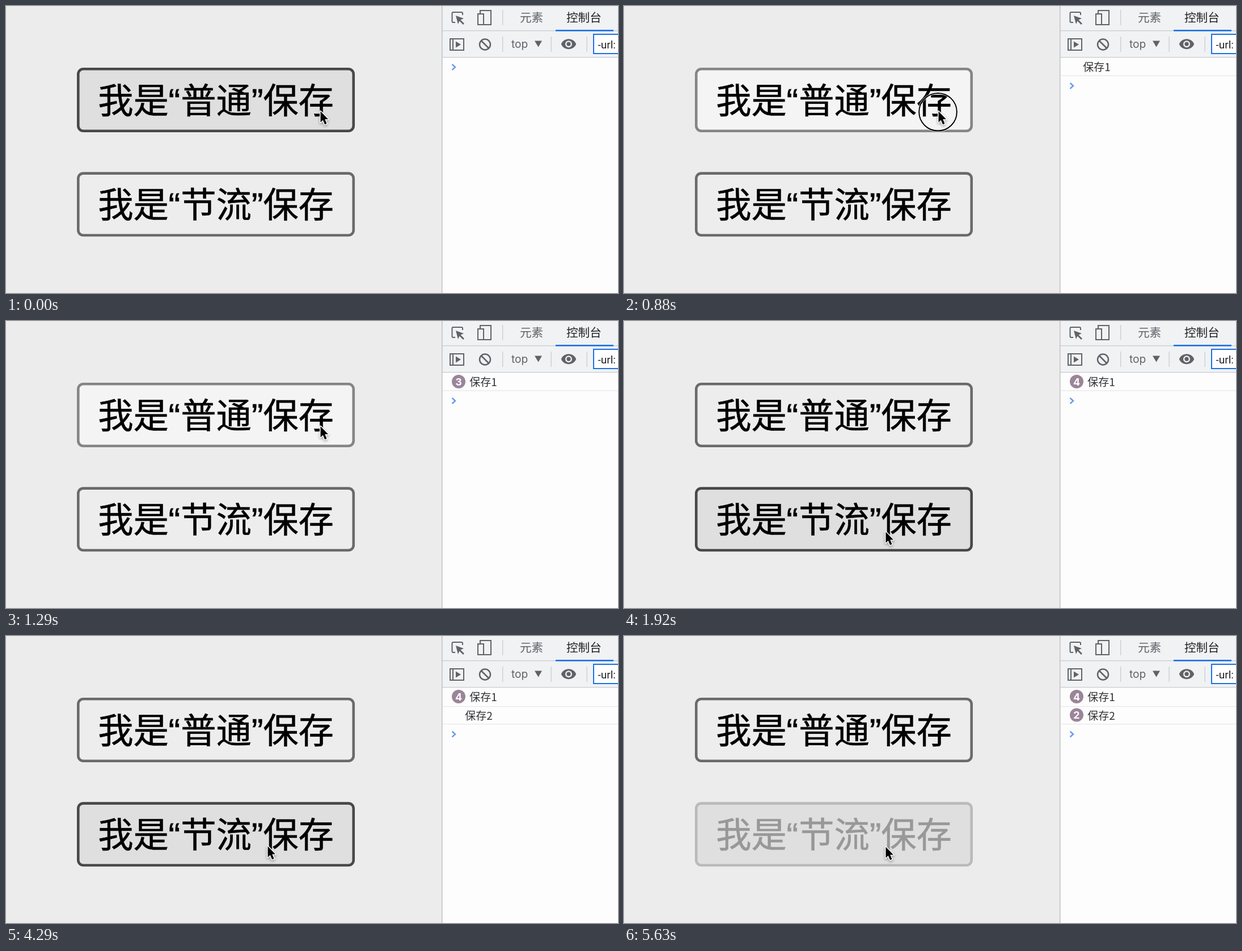
Animation, 1079 px wide and 507 px high, one loop 5930 ms. Source, as an HTML page with a canvas:

```html
<!DOCTYPE html>
<html lang="zh-CN">
<head>
<meta charset="utf-8">
<style>
  html, body { margin: 0; width: 100%; height: 100%; overflow: hidden; background: #ececec; }
  canvas { display: block; }
</style>
</head>
<body>
<canvas id="stage" width="1079" height="507"></canvas>
<script>
const ctx = document.getElementById('stage').getContext('2d');
const LOOP = 5930, LAG = 40, THROTTLE = 2000;
const CJK = '"Noto Sans CJK SC", "Noto Sans CJK", sans-serif';
const LATIN = 'Inter, Roboto, sans-serif';
const QUOTE = '"Liberation Sans", sans-serif';
const GREY = '#5f6368', LINE = '#c9ccd1', BLUE = '#1a6fe8';

// mouse down / up times
const plainClicks = [[580, 700], [780, 900], [980, 1090], [1170, 1290]];
const savedClicks = [[1990, 2070], [4580, 4960]];
const ignoredClicks = [[2210, 2290], [2410, 2500], [2620, 2710], [2790, 2880], [2960, 3040], [5540, 5630]];
const allClicks = [...plainClicks, ...savedClicks, ...ignoredClicks];

const looks = {
  idle: ['#ededed', '#6a6a6a', '#000'],
  hover: ['#dfdfdf', '#484848', '#000'],
  active: ['#f4f4f4', '#858585', '#000'],
  disabled: ['#dfdfdf', '#bababa', '#989898']
};

const pressed = (clicks, t) => clicks.some(([down, up]) => t >= down && t < up);
const finished = (clicks, t) => clicks.filter(([, up]) => t >= up + LAG).length;

function text(str, x, y, size, color, family = CJK, weight = 400) {
  ctx.font = `${weight} ${size}px ${family}`;
  ctx.fillStyle = color;
  ctx.fillText(str, x, y);
}

function rect(x, y, w, h, color) {
  ctx.fillStyle = color;
  ctx.fillRect(x, y, w, h);
}

function stroke(path, color, width) {
  ctx.strokeStyle = color;
  ctx.lineWidth = width;
  ctx.stroke(new Path2D(path));
}

function fill(path, color) {
  ctx.fillStyle = color;
  ctx.fill(new Path2D(path), 'evenodd');
}

function circle(x, y, r) {
  ctx.beginPath();
  ctx.arc(x, y, r, 0, 7);
}

function at(x, y, scale, draw) {
  ctx.save();
  ctx.translate(x, y);
  ctx.scale(scale, scale);
  draw();
  ctx.restore();
}

function button(y, word, look) {
  const [face, border, ink] = looks[look];
  ctx.beginPath();
  ctx.roundRect(127.3, y + 2.3, 485.4, 109.4, 9);
  ctx.fillStyle = face;
  ctx.fill();
  ctx.strokeStyle = border;
  ctx.lineWidth = 4.6;
  ctx.stroke();

  const base = y + 80.5;
  const label = (str, x, family) => {
    text(str, x, base, 62.3, ink, family);
    // slightly heavier than the regular weight
    ctx.strokeStyle = ink;
    ctx.lineWidth = 0.6;
    ctx.strokeText(str, x, base);
  };
  label('我是', 162.3);
  label('“', 286.5, QUOTE);
  label(word, 308.2);
  label('”', 432.8, QUOTE);
  label('保存', 453.2);
}

function toolbar() {
  rect(769, 0, 310, 507, '#fdfdfd');
  rect(769, 0, 310, 91, '#f0f2f4');
  rect(768, 0, 1.5, 507, '#bfc1c4');
  rect(769, 43, 310, 1.3, LINE);
  rect(769, 90, 310, 1.3, LINE);
  rect(969, 42, 102, 2.6, BLUE);
  for (const [x, y] of [[875, 7], [875, 54], [960.5, 54], [1023.5, 54]]) rect(x, y, 1.3, 27, LINE);

  // element picker and device icons
  stroke('M792 29H788.5Q786.5 29 786.5 27V13Q786.5 11 788.5 11H803Q805 11 805 13V16', GREY, 2);
  fill('M793 17L807 22L801.5 24.5L808 31L806 33L799.5 26.5L797 32Z', GREY);
  stroke('M836 13V8H855V33H843M832 14H842V33H832Z', GREY, 2);
  text('元素', 906, 28.2, 20.6, GREY);
  text('控制台', 988, 28.2, 20.6, '#202124');

  // sidebar, clear, context and eye
  stroke('M783 58H807V78H783ZM788 58V78', GREY, 2);
  fill('M793 62.5V73.5L802 68Z', GREY);
  circle(844.5, 68, 9.5);
  ctx.strokeStyle = GREY;
  ctx.lineWidth = 2.5;
  ctx.stroke();
  stroke('M838 61.5L851 74.5', GREY, 2.5);
  text('top', 891, 74, 19.2, GREY, LATIN);
  fill('M932 61.5H945L938.5 72.5Z', GREY);
  at(977.6, 52.8, 1.2, () => fill('M12 4.5C7 4.5 2.7 7.6 1 12c1.7 4.4 6 7.5 11 7.5s9.3-3.1 11-7.5c-1.7-4.4-6-7.5-11-7.5zM12 17a5 5 0 1 1 0-10a5 5 0 0 1 0 10zM12 9a3 3 0 1 0 0 6a3 3 0 0 0 0-6z', GREY));

  rect(1035, 49, 50, 36, BLUE);
  rect(1037, 51, 50, 32, '#fff');
  text('-url:', 1043.5, 74.5, 19, '#202124', 'Roboto, sans-serif');
}

function logRow(y, label, count) {
  if (count > 1) {
    circle(798, y - 1, 12);
    ctx.fillStyle = '#9b8598';
    ctx.fill();
    ctx.textAlign = 'center';
    text(count, 798, y + 5.5, 18, '#fff', LATIN, 700);
    ctx.textAlign = 'left';
  }
  text(label, count > 1 ? 817.2 : 809.2, y + 7, 19, '#303134');
}

function consoleLog(first, second) {
  if (first) {
    logRow(108, '保存1', first);
    rect(769, second ? 124 : 122.5, 310, 1.2, '#e6e6e6');
  }
  if (second) {
    logRow(140.5, '保存2', second);
    rect(769, 155, 310, 1.2, '#e6e6e6');
  }
  const y = second ? 173.5 : first ? 141 : 108;
  stroke(`M786.5 ${y - 5}L792 ${y}L786.5 ${y + 5}`, '#6d9bee', 2.5);
}

function pointer(t) {
  const p = Math.min(1, Math.max(0, (t - 1540) / 340));
  const ease = p * p * (3 - 2 * p);
  const lift = t >= 4250 && t < 4580 ? 1 : 0;
  return { x: 553.5 - 93 * ease, y: 184 + 186.5 * ease - lift };
}

function drawPointer({ x, y }) {
  at(x, y, 1, () => {
    const arrow = 'M1 2V21.5L5.3 17.4L8.6 25.2L12 23.8L8.7 16H14.5Z';
    ctx.lineJoin = 'round';
    ctx.shadowColor = 'rgba(0,0,0,.35)';
    ctx.shadowBlur = 4;
    ctx.shadowOffsetY = 2;
    stroke(arrow, '#fff', 3);
    ctx.shadowColor = 'transparent';
    fill(arrow, '#000');
  });
}

function drawRing({ x, y }) {
  circle(x, y + 3.2, 33.3);
  ctx.strokeStyle = 'rgba(255,255,255,.6)';
  ctx.lineWidth = 4;
  ctx.stroke();
  ctx.strokeStyle = '#000';
  ctx.lineWidth = 2;
  ctx.stroke();
}

function look(clicks, t, hovered) {
  return pressed(clicks, t - LAG) ? 'active' : hovered ? 'hover' : 'idle';
}

function frame(now) {
  const t = now % LOOP;
  const mouse = pointer(t);
  const locked = savedClicks.some(([, up]) => t >= up + LAG && t < up + LAG + THROTTLE);

  rect(0, 0, 1079, 507, '#ececec');
  button(109, '普通', look(plainClicks, t, mouse.y < 223));
  button(293.3, '节流', locked ? 'disabled' : look(savedClicks, t, mouse.y > 293));
  toolbar();
  consoleLog(finished(plainClicks, t), finished(savedClicks, t));
  if (pressed(allClicks, t)) drawRing(mouse);
  drawPointer(mouse);
  requestAnimationFrame(frame);
}
requestAnimationFrame(frame);
</script>
</body>
</html>
```
